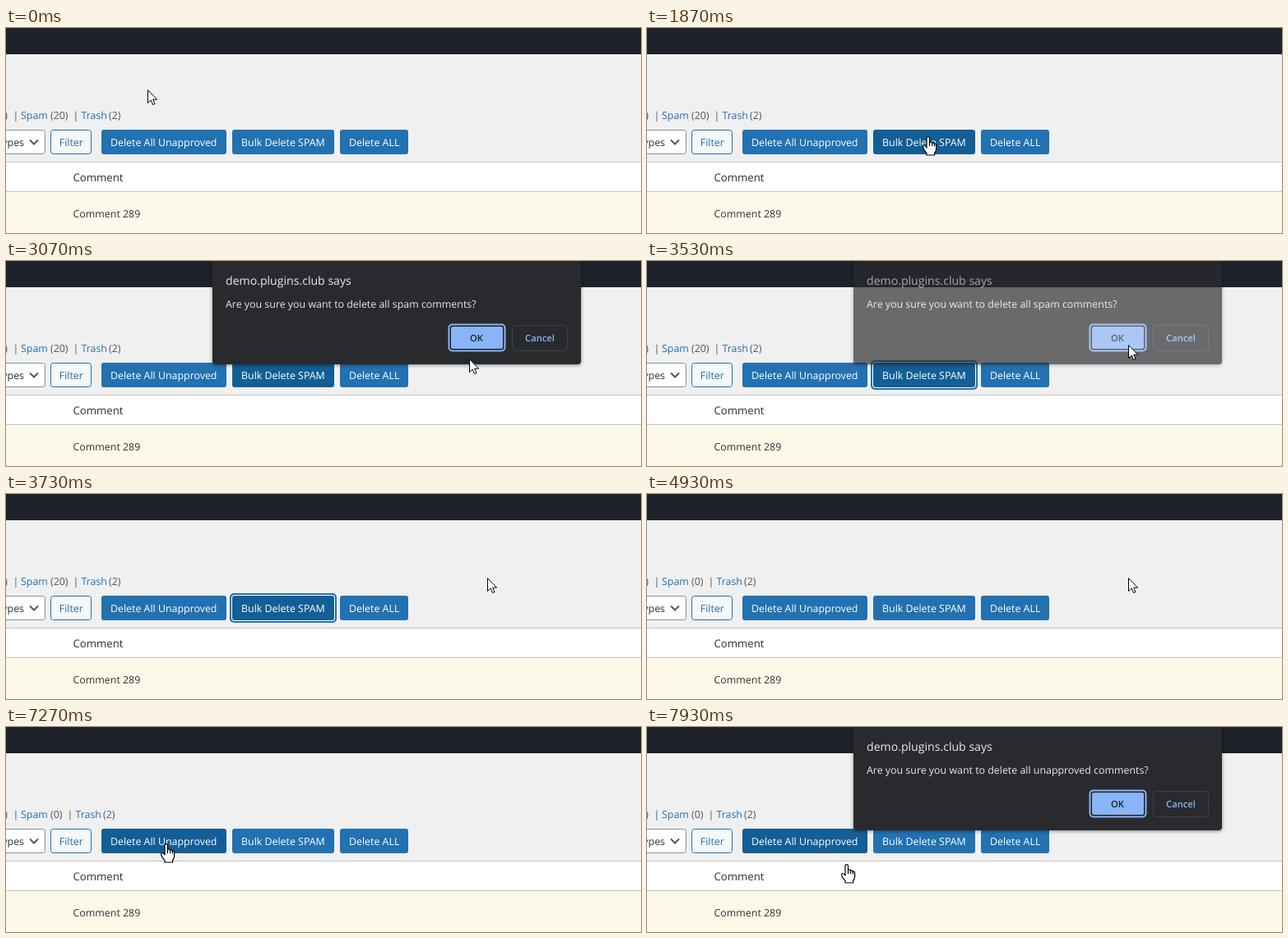
An HTML page for the animation above (8000 ms loop, 772 by 250 pixels).

```html
<!DOCTYPE html>
<html lang="en">
<head>
<meta charset="utf-8">
<title>Bulk delete comments</title>
<style>
  html, body { margin: 0; width: 772px; height: 250px; overflow: hidden; background: #f0f0f1; }
  svg { display: block; }
  text { font: 12.4px "Open Sans", "Noto Sans", sans-serif; fill: #2c3338; text-rendering: geometricPrecision; }
  .link { fill: #2271b1; }
  .count { fill: #50575e; }
  .button { fill: #2271b1; }
  .button.hover { fill: #135e96; }
  .label { fill: #fff; }
  .head { font-size: 13.2px; }
  .dialog text { fill: #e8eaed; }
  .dialog .title { font-size: 14.1px; }
  .dialog .action { font-size: 11.2px; font-weight: 600; text-anchor: middle; }
  .cursor { fill: #fff; stroke: #000; stroke-linejoin: round; }
</style>
</head>
<body>
<svg width="772" height="250" viewBox="0 0 772 250">
  <rect width="772" height="250" fill="#f0f0f1"/>
  <rect width="772" height="32" fill="#1d222b"/>

  <g id="page">
    <text class="count" x="2" y="111" text-anchor="end">)</text>
    <text class="count" x="8.5" y="111">|</text>
    <text class="link" x="18" y="111">Spam</text>
    <text class="count" id="spam" x="54" y="111"></text>
    <g id="trash">
      <text class="count" x="81.5" y="111">|</text>
      <text class="link" x="91.5" y="111">Trash</text>
      <text class="count" x="125" y="111">(2)</text>
    </g>

    <rect x="-20" y="124.5" width="67.5" height="29" rx="3" fill="#fff" stroke="#8c8f94"/>
    <text x="22" y="144" text-anchor="end">types</text>
    <path d="M29 136.5l5 5 5-5" fill="none" stroke="#50575e" stroke-width="2"/>
    <rect x="54.5" y="124.5" width="49" height="29" rx="3" fill="#f6f7f7" stroke="#2271b1"/>
    <text class="link" x="79.3" y="144" text-anchor="middle">Filter</text>

    <g id="ring">
      <rect x="272" y="121" width="130" height="36" rx="5" fill="#2271b1"/>
      <rect x="274" y="123" width="126" height="32" rx="4" fill="#fff"/>
    </g>
    <rect class="button" id="unapproved" x="116" y="124" width="152" height="30" rx="3"/>
    <rect class="button" id="bulk" x="275" y="124" width="124" height="30" rx="3"/>
    <rect class="button" x="406" y="124" width="83" height="30" rx="3"/>
    <text class="label" x="127" y="144">Delete All Unapproved</text>
    <text class="label" x="286" y="144">Bulk Delete SPAM</text>
    <text class="label" x="417" y="144">Delete ALL</text>

    <rect y="163" width="772" height="37" fill="#c3c4c7"/>
    <rect y="164" width="772" height="35" fill="#fff"/>
    <rect y="200" width="772" height="50" fill="#fcf9e8"/>
    <text class="head" x="81.5" y="187">Comment</text>
    <text x="81.5" y="231">Comment 289</text>
  </g>

  <g id="dialog" class="dialog">
    <rect x="251" y="-10" width="448" height="136" rx="4" fill="#292a2d"
      style="filter: drop-shadow(0 1px 2px rgba(0,0,0,.45))"/>
    <text class="title" x="267" y="29">demo.plugins.club says</text>
    <text id="message" x="267" y="57"></text>
    <rect x="538.5" y="77.5" width="68" height="32" rx="4" fill="#202124" stroke="#8ab4f8" stroke-width="2"/>
    <rect x="541" y="80" width="63" height="27" rx="2" fill="#8ab4f8"/>
    <text class="action" x="572" y="98" style="fill:#202124">OK</text>
    <rect x="615.5" y="78.5" width="67" height="31" rx="4" fill="none" stroke="#3f4246"/>
    <text class="action" x="649" y="98" style="fill:#8ab4f8">Cancel</text>
  </g>

  <g id="cursor" class="cursor">
    <path id="arrow" d="M.5 .7V16.5L4.2 13 6.6 18.5 9 17.5 6.7 12.2H11.6Z"/>
    <path id="hand" stroke-width="1.2" d="M-2 13V2.2Q-2 .6 -.3 .6 1.5 .6 1.5 2.2V8Q1.7 6.8 3 6.8 4.6 6.8 4.6 8.8 4.8 7.6 6 7.8 7.4 8 7.4 10 7.8 8.8 8.8 9.2 9.6 9.6 9.6 11V16Q9.3 18.5 7.6 20.5V23H-2V20.6Q-5 17.5 -6.4 14 -6.9 12 -5.4 11.5 -4 11.3 -2 14ZM1.5 8V12M4.6 8.8V12M7.4 10V12.5"/>
  </g>
</svg>
<script>
  const TICKS = 120, TICK = 8000 / TICKS;
  const $ = id => document.getElementById(id);
  const show = (id, on) => $(id).style.display = on ? "" : "none";
  const between = (k, a, b) => k >= a && k < b;

  // start tick, end tick, end point, optional control point of the curve
  const moves = [
    [19, 27, 342, 132, 250, 52],
    [40, 41, 340, 132],
    [42, 44, 458, 133],
    [45, 46, 563, 119],
    [46, 51, 585, 102],
    [95, 104, 195, 142, 440, -16],
    [118, 119, 243, 167]
  ];

  function cursorAt(k) {
    let x = 172, y = 75;
    for (const [a, b, tx, ty, cx = (x + tx) / 2, cy = (y + ty) / 2] of moves) {
      if (k <= a) break;
      const p = Math.min(1, (k - a) / (b - a));
      const u = p * p * (3 - 2 * p);
      const bend = (s, c, e) => (1 - u) ** 2 * s + 2 * u * (1 - u) * c + u * u * e;
      x = bend(x, cx, tx);
      y = bend(y, cy, ty);
    }
    return [Math.round(x), Math.round(y)];
  }

  function dialogOpacity(k) {
    if (k < 36 || between(k, 56, 112)) return 0;
    if (k < 39) return (k - 35) / 3;
    if (between(k, 53, 56)) return k < 55 ? 0.67 : 0.33;
    return between(k, 112, 114) ? 0.6 : 1;
  }

  function draw(k) {
    const cleared = k >= 71;
    const pointing = between(k, 28, 41) || k >= 106;
    show("page", !between(k, 71, 74));
    show("ring", between(k, 53, 71));
    show("arrow", !pointing);
    show("hand", pointing);
    $("spam").textContent = cleared ? "(0)" : "(20)";
    $("trash").setAttribute("transform", `translate(${cleared ? -7 : 0})`);
    $("bulk").classList.toggle("hover", between(k, 27, 71));
    $("unapproved").classList.toggle("hover", k >= 106);
    $("message").textContent =
      `Are you sure you want to delete all ${cleared ? "unapproved" : "spam"} comments?`;
    $("dialog").style.opacity = dialogOpacity(k);
    $("cursor").setAttribute("transform", `translate(${cursorAt(k)})`);
  }

  function frame() {
    // small lead absorbs rounding at tick boundaries
    draw(Math.floor((performance.now() + 4) / TICK) % TICKS);
    requestAnimationFrame(frame);
  }
  frame();
</script>
</body>
</html>
```
